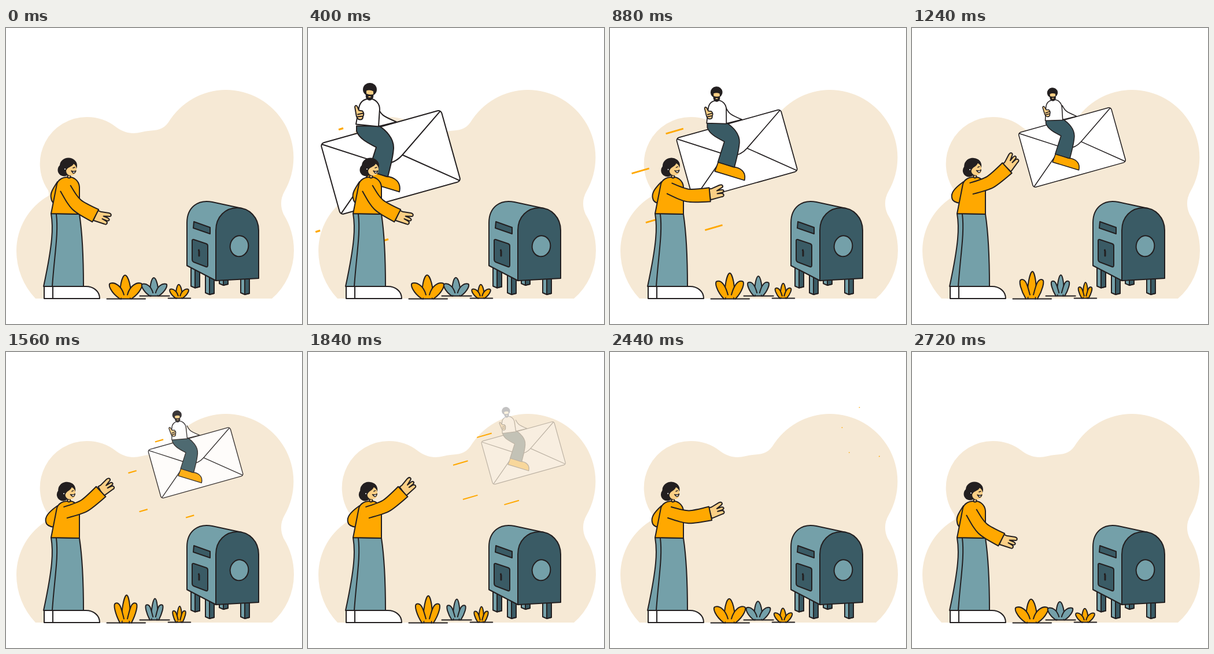
An HTML page that plays this animation: 512x512 px, repeating every 2880 ms.

```html
<!DOCTYPE html>
<html lang="en">
<head>
<meta charset="utf-8">
<title>Sending a letter</title>
<style>
  html, body { margin: 0; width: 100%; height: 100%; overflow: hidden; background: #fff; }
  svg { display: block; width: 100vw; height: 100vh; }
  .ink { stroke: #231f20; stroke-width: 2; stroke-linejoin: round; stroke-linecap: round; }
  .none { fill: none; }
  .white { fill: #fff; }
  .gold { fill: #ffa800; }
  .sky { fill: #74a0a9; }
  .teal { fill: #3a5b65; }
  .skin { fill: #fbcf85; }
  .black { fill: #231f20; }
  #dashes { fill: none; stroke: #ffa800; stroke-width: 3.3; }
  #plants path { vector-effect: non-scaling-stroke; }
</style>
</head>
<body>
<svg viewBox="0 0 512 512">
  <defs>
    <g id="leg">
      <path class="sky" d="M0-34V0L7 3L15 1V-34Z"/>
      <path class="teal" d="M7-34V3L15 1V-34Z"/>
    </g>
  </defs>

  <path fill="#f6e9d5" d="M51 468A121 121 0 0 1 18 385A109 109 0 0 1 74 290Q75 287 73 281A81 81 0 0 1 140 154A81 81 0 0 1 190 171C205 182 218 184 235 180C255 175 268 181 281 163A117 117 0 0 1 380 107A117 117 0 0 1 482 282Q471 301 480 322A119 119 0 0 1 498 385A110 110 0 0 1 460 468Z"/>

  <g id="mailbox" class="ink">
    <use href="#leg" x="369" y="442"/>
    <use href="#leg" x="320" y="446.500"/>
    <use href="#leg" x="345" y="458"/>
    <use href="#leg" x="406" y="458"/>
    <path class="sky" d="M313 411V337C313 310 332 296 357 301L408 312L363 437Z"/>
    <path class="teal" d="M363 437V350C363 326 380 311 400 311C421 311 437 328 437 350V433Z"/>
    <path class="teal" d="M325 335L353 345V356L324 346Z"/>
    <path class="teal" d="M325 366L346 373Q349 374 349 377V410Q349 414 346 413L325 405Q322 404 322 400V368Q322 365 325 366Z"/>
    <path d="M333.500 384V385M334 386V394" stroke-width="3"/>
    <ellipse class="sky" cx="403.500" cy="377.300" rx="15.800" ry="18" transform="rotate(8 403.500 377.300)"/>
  </g>

  <g id="flight">
    <path id="dashes" d="M61 173l-86 25M-7 252l-86 25M21 350l-86 25M139 365l-86 25"/>
    <g id="letter" class="ink">
      <g transform="translate(143 232) rotate(-15.600)">
        <rect class="white" x="-108" y="-64" width="216" height="128" rx="6"/>
        <path class="none" d="M-106-62L-23-7Q0 8 23-7L106-62M-106 62L-23-7M106 62L23-7"/>
      </g>
      <path class="white" d="M121 138C127 150 129 152 153 162L121 170"/>
      <path class="gold" d="M106 246L99 265L158 283C162 266 150 257 134 256Z"/>
      <path class="teal" d="M84 169L123 169C134 176 149 190 148 208C147 225 142 240 138 257L105 247L118 206C105 199 89 192 84 178Z"/>
      <g id="rider">
        <path class="white" d="M83 166L88 138C90 126 98 122 107 122C118 122 124 132 124 140L122 170Z"/>
        <path class="skin" d="M83 148L81 136Q82 132 85 135L88 142L94 143Q98 147 95 153Q95 158 90 158Q84 158 83 148ZM86 149L95 147M86 153L95 152"/>
        <g stroke="none">
          <ellipse class="black" cx="107" cy="106" rx="12" ry="11.500"/>
          <ellipse class="black" cx="106.500" cy="117" rx="6.800" ry="8"/>
          <path class="skin" d="M101 108Q107 106 113 109V114Q107 116 101 113Z"/>
          <ellipse class="skin" cx="106.500" cy="118.500" rx="2.500" ry="1"/>
        </g>
      </g>
    </g>
  </g>

  <g id="woman" class="ink">
    <path id="backArm" class="gold"/>
    <path class="sky" d="M78 321C82 345 81 372 65 447H134C134 400 132 355 127 322Z"/>
    <path class="none" d="M87 322C91 355 84 390 80 447"/>
    <path class="white" d="M66 447V468H162C162 455 151 447 138 447ZM81 447V468"/>
    <path class="gold" d="M78 321L127 322V275C126 262 115 257 107 258C97 258 90 263 88 270Z"/>
    <g id="head">
      <circle class="skin" cx="109" cy="257" r="2.500"/>
      <g stroke="none">
        <ellipse class="black" cx="108" cy="238" rx="15" ry="13.500"/>
        <circle class="black" cx="100.500" cy="245.500" r="11"/>
        <path class="skin" d="M104 247C106 240 114 241 117 235C122 238 123 244 121 250C118 257 107 257 104.500 250Z"/>
        <circle class="white" cx="102" cy="244" r="1"/>
      </g>
      <path class="white" stroke-width="1.400" d="M113 247Q117 249 121 247Q119 252 116 251Z"/>
      <path stroke-width="1.400" d="M116 242L119 241"/>
    </g>
    <path id="hand" class="skin" d="M0-10H5L19-14C25-15 26-10 21-8.500L13-5L21-5.500C26-5 26-1 21-.5L13 0L20 .5C25 1 25 7 20 6.500L0 9Z"/>
    <path id="sleeveFill" class="gold" stroke="none"/>
    <path id="sleeve" class="none"/>
  </g>

  <g id="plants" class="ink"></g>
</svg>
<script>
const LOOP = 2880, STEP = 40;
const el = id => document.getElementById(id);
const set = (id, name, value) => el(id).setAttribute(name, value);
const clamp = v => Math.max(0, Math.min(1, v));
const ramp = (t, from, to) => clamp((t - from) / (to - from));
const smooth = v => v * v * (3 - 2 * v);
const hump = v => (1 - Math.cos(2 * Math.PI * v)) / 2;
const mix = (a, b, p) => a + (b - a) * p;

// Point reached by going along a direction, then sideways from it
function offset([x, y], degrees, along, side) {
  const a = degrees * Math.PI / 180, cos = Math.cos(a), sin = Math.sin(a);
  return [x + cos * along - sin * side, y + sin * along + cos * side];
}

// Three leaves that stand up and get slimmer as k goes from 0 to 1
function plant(x, y, size, color, k) {
  const slim = 1 - .22 * k, tipX = mix(-26, -17, k), tipY = mix(-27, -34, k);
  const side = flip => `<path class="${color}" transform="scale(${flip} 1)"
    d="M-10 0C${tipX} ${tipY * .4} ${tipX - 6} ${tipY + 1} ${tipX} ${tipY}C${tipX + 8} ${tipY - 2}-7-22-3-7"/>`;
  return `<g transform="translate(${x} ${y}) scale(${size})">
    <path class="${color}" transform="rotate(${mix(-1.5, 2, k)}) scale(${slim} ${1 + .17 * k})"
      d="M-8 0C-12-18-5-41 0-41C5-41 12-18 8 0"/>${side(1)}${side(-1)}
    <path d="M${-32.5} 0H${34}"/></g>`;
}

function drawFlight(t) {
  const u = t - 400;
  const x = 143 + .1595 * u;
  const y = 232.4 - .026 * u - 6.8e-9 * u ** 3;
  set('flight', 'transform', `translate(${x} ${y}) scale(${1 - .000274 * u}) translate(-143 -232)`);
  el('flight').style.display = t >= 280 && t < 2480 ? '' : 'none';
  el('letter').style.opacity = ramp(t, 240, 360) * (1 - ramp(t, 1510, 1960));
  set('rider', 'transform', `translate(0 ${.0035 * u}) rotate(${-.0088 * u} 105 170)`);

  // A visible window runs along every dash track
  const track = Math.hypot(86, 25);
  const phase = t < 326 ? 0 : (t - 326) % 1040;
  const front = clamp(phase / 800), rear = ramp(phase, 430, 860);
  el('dashes').style.visibility = front > rear ? '' : 'hidden';
  set('dashes', 'stroke-dasharray', `0 ${track * rear} ${track * (front - rear)} ${2 * track}`);
}

function drawWoman(t) {
  const raise = smooth(ramp(t, 520, 1280)) * (1 - smooth(ramp(t, 2220, 2700)));
  const upper = mix(60, -16, raise), fore = mix(27, -43, raise);
  const shoulder = [103, 277.5];
  const elbow = offset(shoulder, upper, 34, 0);
  const wrist = offset(elbow, fore, 39, 0);
  const edge = side => [
    offset(shoulder, upper, 0, 10 * side),
    offset(elbow, (upper + fore) / 2, 0, 11 * side),
    offset(wrist, fore, 0, 12 * side)];
  const [s1, e1, w1] = edge(-1), [s2, e2, w2] = edge(1);
  const outline = `M${s1}C${e1} ${e1} ${w1}L${w2}C${e2} ${e2} ${s2}`;
  set('sleeve', 'd', outline);
  set('sleeveFill', 'd', outline + 'Z');

  const wave = t > 1240 && t < 2200 ? 24 * hump((t - 1240) / 480) : 0;
  set('hand', 'transform', `translate(${wrist}) rotate(${mix(25, -47, raise) + wave})`);

  const back = 78 - 9 * raise;
  set('backArm', 'd', `M89 266C${back + 3} 278 ${back - 2} 286 ${back} 294Q${back + 1} 301 83 303`);
  set('head', 'transform', `rotate(${-8 * clamp(raise * 1.6)} 108 258)`);
}

function draw(now) {
  const t = Math.floor(now % LOOP / STEP) * STEP;
  drawFlight(t);
  drawWoman(t);
  const k = hump(ramp(t, 280, 2720));
  el('plants').innerHTML = plant(207, 468.5, 1, 'gold', k)
    + plant(256.5, 463.5, .77, 'sky', k) + plant(299.5, 467.5, .58, 'gold', k);
}

let start;
function tick(now) {
  start ??= now;
  draw(now - start);
  requestAnimationFrame(tick);
}
draw(0);
requestAnimationFrame(tick);
</script>
</body>
</html>
```
